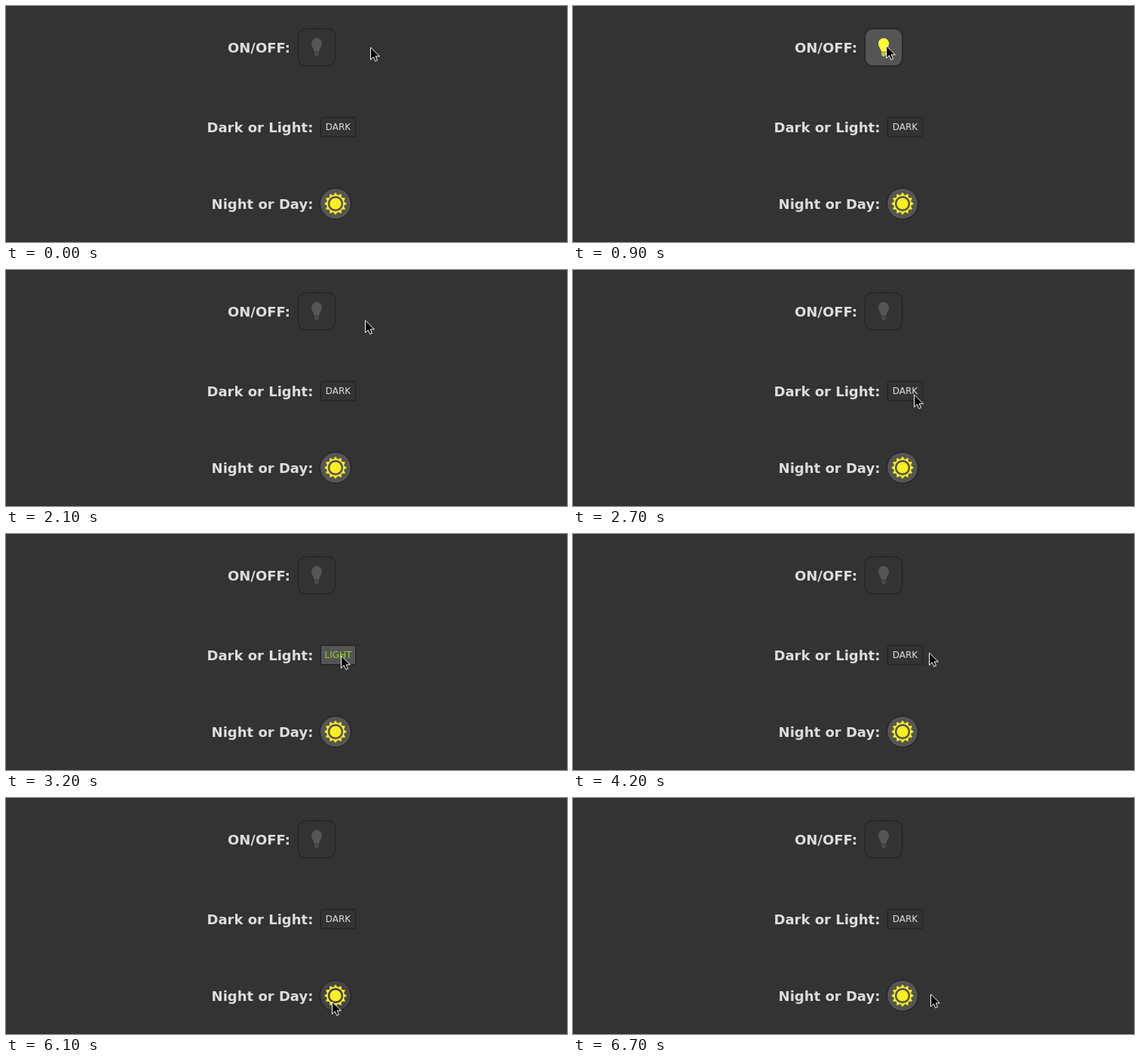
Recreate the animation shown at these times as an HTML page. Size 744 px wide and 314 px high, loop 7800 ms.

```html
<!DOCTYPE html>
<html lang="en">
<head>
<meta charset="utf-8">
<title>Toggle buttons</title>
<style>
  html, body { margin: 0; width: 100%; height: 100%; overflow: hidden; background: #333; }
  svg { display: block; width: 744px; height: 314px; }
  text { font-family: "DejaVu Sans", sans-serif; }
  .label { font-size: 18px; font-weight: bold; fill: #ddd; }
  .toggle { --on: 0%; }
  .face { fill: color-mix(in srgb, #333, #555 var(--on)); stroke: #222; }
  .halo { fill: none; stroke: #000; stroke-width: 3; opacity: .1; }
  .bulb { fill: color-mix(in srgb, #555, #ff3 var(--on)); }
  .word { font-size: 12px; text-anchor: middle; fill: color-mix(in srgb, #ddd, #9acd32 var(--on)); }
  .gap { fill: color-mix(in srgb, #333, #555 var(--on)); }
  .sun { fill: #fe2; }
  .moon { fill: #ccc; }
</style>
</head>
<body>
<svg viewBox="0 0 744 314">
  <text class="label" x="294" y="62">ON/OFF:</text>
  <text class="label" x="266.5" y="168">Dark or Light:</text>
  <text class="label" x="272.6" y="270">Night or Day:</text>

  <g class="toggle" id="power">
    <rect class="halo" x="387.5" y="30.5" width="49" height="49" rx="10"/>
    <rect class="face" x="387.5" y="30.5" width="49" height="49" rx="10"/>
    <path class="bulb" d="M409 61C408.5 57 405 54 405 49.7a7 7 0 0 1 14 0C419 54 415.5 57 415 61z
      M409 62h6v1.4h-6z M409 64.2h6v1.3h-6z M410.5 66h3v1h-3z"/>
  </g>

  <g class="toggle" id="shade">
    <rect class="halo" x="417.5" y="148.5" width="46" height="25" rx="2"/>
    <rect class="face" x="417.5" y="148.5" width="46" height="25" rx="2"/>
    <text class="word" id="word" x="440.5" y="165">DARK</text>
  </g>

  <g class="toggle" id="day">
    <circle class="halo" cx="437" cy="263" r="20.5"/>
    <circle class="face" cx="437" cy="263" r="20.5"/>
    <g id="sun" transform="translate(437 263)">
      <polygon class="sun" id="rays"/>
      <circle class="gap" r="10.2"/>
      <circle class="sun" r="7.6"/>
    </g>
    <path class="moon" id="moon" d="M440 250a13 13 0 1 0 10 17a11 11 0 0 1 -10 -17z"/>
  </g>

  <path id="cursor" d="M.5 1V17.5L4.3 13.9 6.8 19.4 9.5 18.2 7.2 12.9H12.4Z"
    fill="#000" stroke="#fff" stroke-linejoin="round"/>
</svg>
<script>
const LOOP = 7800, STEP = 100;
const get = id => document.getElementById(id);

// The pointer rests between legs; each leg bends towards `via`.
const home = [483, 54];
const legs = [
  { start: 200, end: 600, via: [450, 55], to: [415, 52] },
  { start: 1700, end: 2100, via: [450, 58], to: [476, 66] },
  { start: 2100, end: 2800, via: [494, 190], to: [444, 161] },
  { start: 4000, end: 4400, via: [474, 156], to: [484, 157] },
  { start: 4500, end: 5200, via: [492, 262], to: [432, 270] },
  { start: 6200, end: 6500, via: [455, 266], to: [474, 260] }
];

const clamp = v => Math.min(1, Math.max(0, v));
const easeOut = p => 1 - (1 - p) ** 1.25;

function pointerAt(t) {
  let point = home;
  for (const { start, end, via, to } of legs) {
    const u = easeOut(clamp((t - start) / (end - start)));
    point = point.map((from, i) =>
      from * (1 - u) ** 2 + 2 * via[i] * u * (1 - u) + to[i] * u * u);
  }
  return point.map(Math.round);
}

// Progress of a fade whose first visible step falls at `start`
const fade = (t, start, steps) => clamp(((t - start) / STEP + 1) / steps);
const pulse = (t, start, end, steps) => fade(t, start, steps) - fade(t, end, steps);
const setOn = (id, level) => get(id).style.setProperty('--on', level * 100 + '%');

get('rays').setAttribute('points', Array.from({ length: 24 }, (_, i) => {
  const r = i % 2 ? 11.3 : 15, a = i * Math.PI / 12;
  return [r * Math.sin(a), -r * Math.cos(a)].map(v => v.toFixed(2));
}).join(' '));

function draw(now) {
  const t = Math.floor(now % LOOP / STEP) * STEP;
  const isLight = t >= 3000 && t < 3800;
  const isNight = t >= 5400 && t < 6100;
  setOn('power', pulse(t, 700, 1500, 3));
  setOn('shade', pulse(t, 3000, 3800, 3));
  setOn('day', 1 - pulse(t, 5400, 6100, 2));
  get('word').textContent = isLight ? 'LIGHT' : 'DARK';
  get('sun').style.display = isNight ? 'none' : '';
  get('moon').style.display = isNight ? '' : 'none';
  get('cursor').setAttribute('transform', `translate(${pointerAt(t)})`);
}

const begin = performance.now();
function tick() {
  draw(performance.now() - begin);
  requestAnimationFrame(tick);
}
tick();
</script>
</body>
</html>
```
